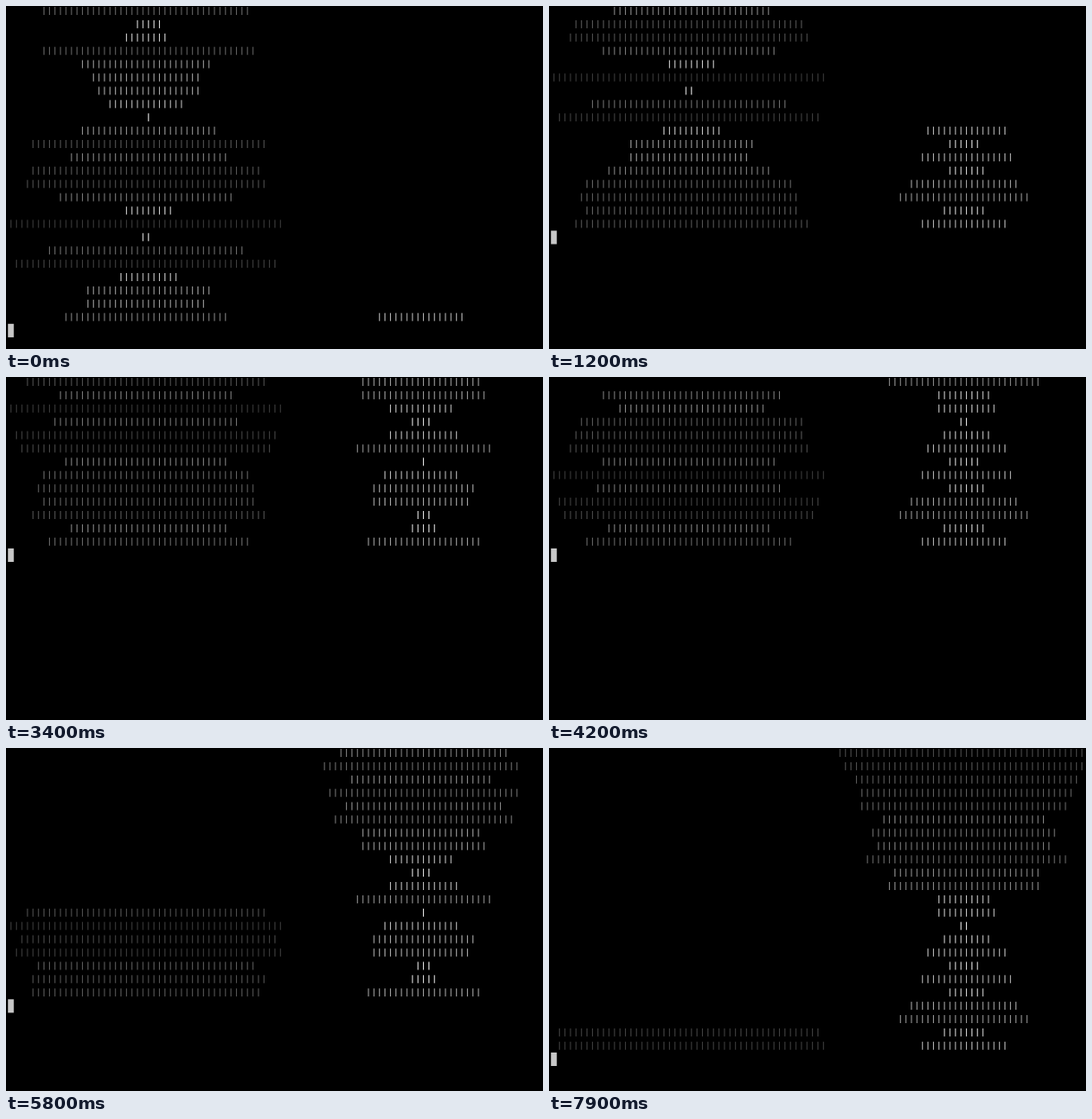
An HTML page with a canvas for the animation above (8000 ms loop, 600 by 384 pixels).

```html
<!DOCTYPE html>
<html lang="en">
<head>
<meta charset="utf-8">
<title>Two-stack sort</title>
<style>
html, body { margin: 0; width: 100%; height: 100%; overflow: hidden; background: #000; }
canvas { display: block; }
</style>
</head>
<body>
<canvas id="stage" width="600" height="384"></canvas>
<script>
const ctx = document.getElementById('stage').getContext('2d');
const LOOP = 8000, STEP = 100;
const COL = 6.145, ROW = 14.9;

// The shuffled numbers to sort, top of stack first.
const input = [
  21, 16, 38, 28, 5, 40, 8, 33, 39, 3, 24, 18, 20, 27, 19, 7, 14,
  17, 1, 6, 25, 15, 43, 41, 29, 13, 42, 37, 44, 35, 32, 45, 9, 4,
  50, 26, 2, 34, 36, 12, 48, 47, 11, 46, 23, 10, 22, 49, 30, 31
];
const SIZE = input.length;
const FIRST_OP = 2;

// Each pass pushes the smaller half of A onto B, then winds A back round.
function sortStates() {
  const a = input.slice(), b = [], states = [];
  const save = () => states.push({ a: a.slice(), b: b.slice() });
  save();
  while (a.length > 4) {
    const limit = b.length + Math.floor(a.length / 2);
    for (let n = a.length; n > 0; n--) {
      const v = a.shift();
      if (v <= limit) b.unshift(v);
      else a.push(v);
      save();
    }
    for (let n = a.length; n > 0; n--) {
      a.unshift(a.pop());
      save();
    }
  }
  return states;
}
const states = sortStates();

// A steady pace that slackens a little after five seconds.
function opAt(t) {
  return FIRST_OP + Math.round(t * 0.0182 - Math.max(0, t - 5000) * 0.0009);
}

function drawBars(value, row, firstCol) {
  const grey = Math.round(225 - (value - 1) * 3.45);
  ctx.fillStyle = `rgb(${grey},${grey},${grey})`;
  const lead = firstCol + SIZE / 2 - Math.floor(value / 2);
  for (let i = 0; i < value; i++) {
    ctx.fillRect(5 + (lead + i) * COL, row * ROW + 1, 1.1, 9);
  }
}

// Every second value is shown, counted from the top.
function drawStack(list, rows, firstCol) {
  const shown = list.filter((v, i) => i % 2 === 0);
  shown.forEach((v, i) => drawBars(v, rows - shown.length + i, firstCol));
}

function draw(t) {
  const { a, b } = states[opAt(t)];
  const rows = Math.ceil(Math.max(a.length, b.length) / 2);
  ctx.fillStyle = '#000';
  ctx.fillRect(0, 0, 600, 384);
  drawStack(a, rows, 0);
  drawStack(b, rows, SIZE);
  ctx.fillStyle = '#c8c8c8';
  ctx.fillRect(2.2, rows * ROW - 1.8, 6.5, 15.1);
}

const begin = performance.now();
function tick() {
  const t = (performance.now() - begin) % LOOP;
  draw(Math.floor(t / STEP) * STEP);
  requestAnimationFrame(tick);
}
tick();
</script>
</body>
</html>
```
